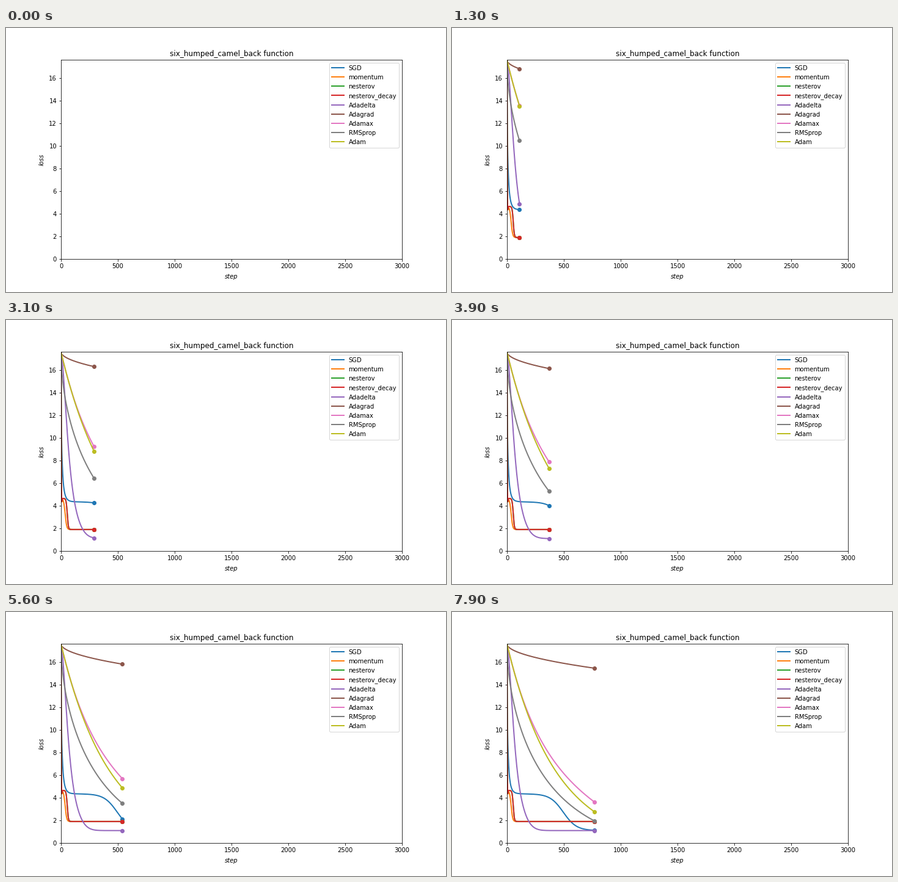
Animation, 720 px wide and 432 px high, one loop 8 s. Source, as a matplotlib script:

```python
import numpy as np
import matplotlib.pyplot as plt
from matplotlib.animation import FuncAnimation

FRAMES = 80
STEPS_PER_FRAME = 10
START = 17.6

plt.rcParams.update({"font.family": "DejaVu Sans", "font.size": 10})

s = np.arange(FRAMES * STEPS_PER_FRAME, dtype=float)


def fall(height, tau, power):
    """Stretched exponential drop from height to zero."""
    return height * np.exp(-(s / tau) ** power)


def slide(height, middle, width):
    """Logistic drop from height to zero."""
    return height / (1 + np.exp((s - middle) / width))


def fade(rate, bend=0, twist=0, root=0):
    """Exponential decay from START whose rate drifts with the step."""
    return (START + 1) * np.exp(-root * np.sqrt(s) - s * (rate + bend * s + twist * s ** 2)) - 1


def rebound(middle, width):
    """Steep drop with a small overshoot, a short plateau, then a slide to the floor."""
    return 1.9 + fall(12.95, 2.2, 1) * np.cos(0.3 * s) + slide(2.75, middle, width)


curves = {
    "SGD": 1.1 + fall(13.25, 7, 0.68) + slide(3.25, 495, 58),
    "momentum": rebound(36.5, 6.8),
    "nesterov": rebound(55, 4.9),
    "nesterov_decay": rebound(55, 4.9),
    "Adadelta": 1.1 + fall(10.7, 60, 1.6) + fall(5.8, 136, 2),
    "Adagrad": START - 0.0675 * s ** 0.52,
    "Adamax": fade(2.331e-3, -1.1214e-6, 5.76e-10),
    "RMSprop": fade(1.172e-3, root=0.0338),
    "Adam": fade(2.27e-3, -2.5e-7),
}

fig = plt.figure(figsize=(10, 6), dpi=72, facecolor="white")
fig.subplots_adjust(left=0.125, right=0.9, bottom=0.125, top=0.88)
ax = fig.add_subplot()
ax.set_title("six_humped_camel_back function", fontsize=12)
ax.set_xlabel("step", style="italic", labelpad=6.5)
ax.set_ylabel("loss", style="italic", labelpad=6.5)
ax.set_xlim(0, 3000)
ax.set_ylim(0, 17.63)

lines, dots = [], []
for i, name in enumerate(curves):
    lines += ax.plot([], [], color=f"C{i}", lw=2, label=name)
    dots += ax.plot([], [], "o", color=f"C{i}")
ax.legend(loc="upper right")


def draw(n):
    last = max(0, (n - 2) * STEPS_PER_FRAME)
    shown = slice(0, last + 1 if n else 0)
    for line, dot, loss in zip(lines, dots, curves.values()):
        line.set_data(s[shown], loss[shown])
        dot.set_data(s[shown][-1:], loss[shown][-1:])
    return lines + dots


anim = FuncAnimation(fig, draw, frames=FRAMES, init_func=lambda: draw(0),
                     interval=100, repeat=True, repeat_delay=0)
plt.show()
```
